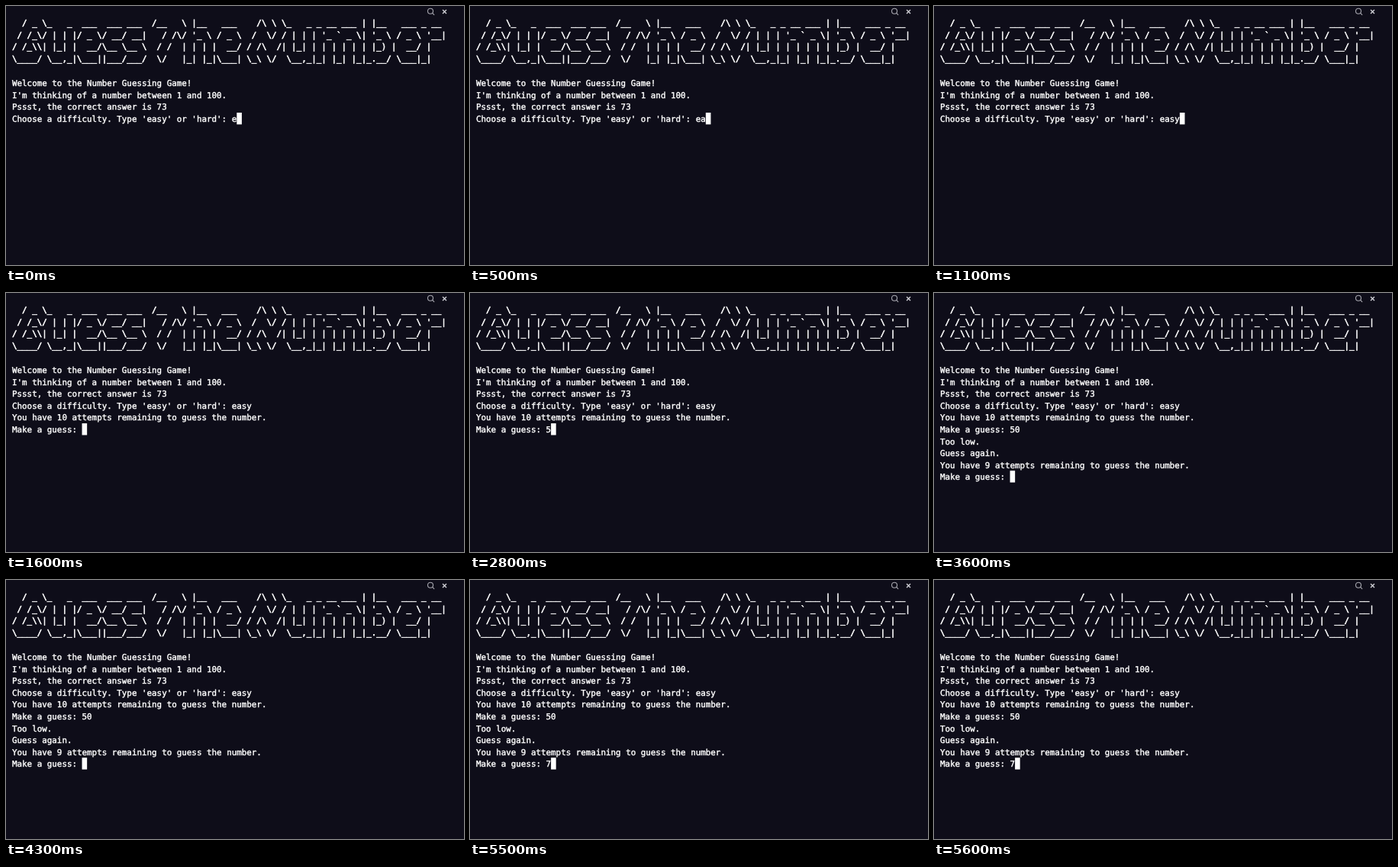
Recreate the animation shown at these times as an HTML page. Size 600 by 340 pixels, loop 6000 ms.

```html
<!DOCTYPE html>
<html lang="en">
<head>
<meta charset="utf-8">
<title>Number guessing game</title>
<style>
  html, body { margin: 0; width: 100%; height: 100%; overflow: hidden; background: #0e0d19; }
  svg { display: block; width: 600px; height: 340px; }
  text {
    font: 10.863px "DejaVu Sans Mono", monospace;
    fill: #fff;
    stroke: #fff;
    stroke-width: 0.4;
    white-space: pre;
    text-rendering: geometricPrecision;
    font-variant-ligatures: none;
  }
  #banner text { stroke-width: 0.6; }
  .icon { fill: none; stroke: #a8a8b0; stroke-width: 1.1; }
</style>
</head>
<body>
<svg viewBox="0 0 600 340">
  <rect width="600" height="340" fill="#0e0d19"/>
  <g class="icon">
    <circle cx="556" cy="6.7" r="3.5"/>
    <path d="M558.5 9.2l2.6 2.6"/>
    <path d="M572 4.9l5 5m0-5l-5 5" stroke="#d0d0d6" stroke-width="1.4"/>
  </g>
  <g id="banner"></g>
  <g id="screen"></g>
  <rect id="cursor" width="6.6" height="15.4" fill="#fff"/>
</svg>
<script>
const LOOP = 6000;
const LEFT = 8, CHAR = 6.54, LINE = 15.54;
const BANNER_BASELINE = 26.4, TEXT_BASELINE = 105.3, ASCENT = 11.9;

const tick = "`";
const banner = String.raw`
  / _ \_   _  ___  ___ ___  /__   \ |__   ___    /\ \ \_   _ _ __ ___ | |__   ___ _ __
 / /_\/ | | |/ _ \/ __/ __|   / /\/ '_ \ / _ \  /  \/ / | | | '_ ${tick} _ \| '_ \ / _ \ '__|
/ /_\\| |_| |  __/\__ \__ \  / /  | | | |  __/ / /\  /| |_| | | | | | | |_) |  __/ |
\____/ \__,_|\___||___/___/  \/   |_| |_|\___| \_\ \/  \__,_|_| |_| |_|_.__/ \___|_|`.slice(1);

const intro = `Welcome to the Number Guessing Game!
I'm thinking of a number between 1 and 100.
Pssst, the correct answer is 73
Choose a difficulty. Type 'easy' or 'hard': `;

const attempt = n => `\nYou have ${n} attempts remaining to guess the number.\nMake a guess: `;

// Each event appends keyboard input or program output.
const events = [
  [0, intro + "e"],
  [500, "a"],
  [800, "s"],
  [1100, "y"],
  [1600, attempt(10)],
  [2800, "5"],
  [3000, "0"],
  [3600, "\nToo low.\nGuess again." + attempt(9)],
  [5500, "7"]
];

const byId = id => document.getElementById(id);
const cursor = byId("cursor");

function showLines(group, lines, baseline) {
  group.replaceChildren(...lines.map((line, i) => {
    const row = document.createElementNS("http://www.w3.org/2000/svg", "text");
    row.setAttribute("x", LEFT);
    row.setAttribute("y", baseline + i * LINE);
    row.textContent = line;
    return row;
  }));
}

let shown = null;

function render(time) {
  const output = events.filter(([at]) => at <= time).map(([, text]) => text).join("");
  if (output === shown) return;
  shown = output;
  const lines = output.split("\n");
  const last = lines.length - 1;
  showLines(byId("screen"), lines, TEXT_BASELINE);
  cursor.setAttribute("x", LEFT + lines[last].length * CHAR);
  cursor.setAttribute("y", TEXT_BASELINE + last * LINE - ASCENT);
}

showLines(byId("banner"), banner.split("\n"), BANNER_BASELINE);
const start = performance.now();

function frame() {
  render((performance.now() - start) % LOOP);
  requestAnimationFrame(frame);
}

frame();
</script>
</body>
</html>
```
